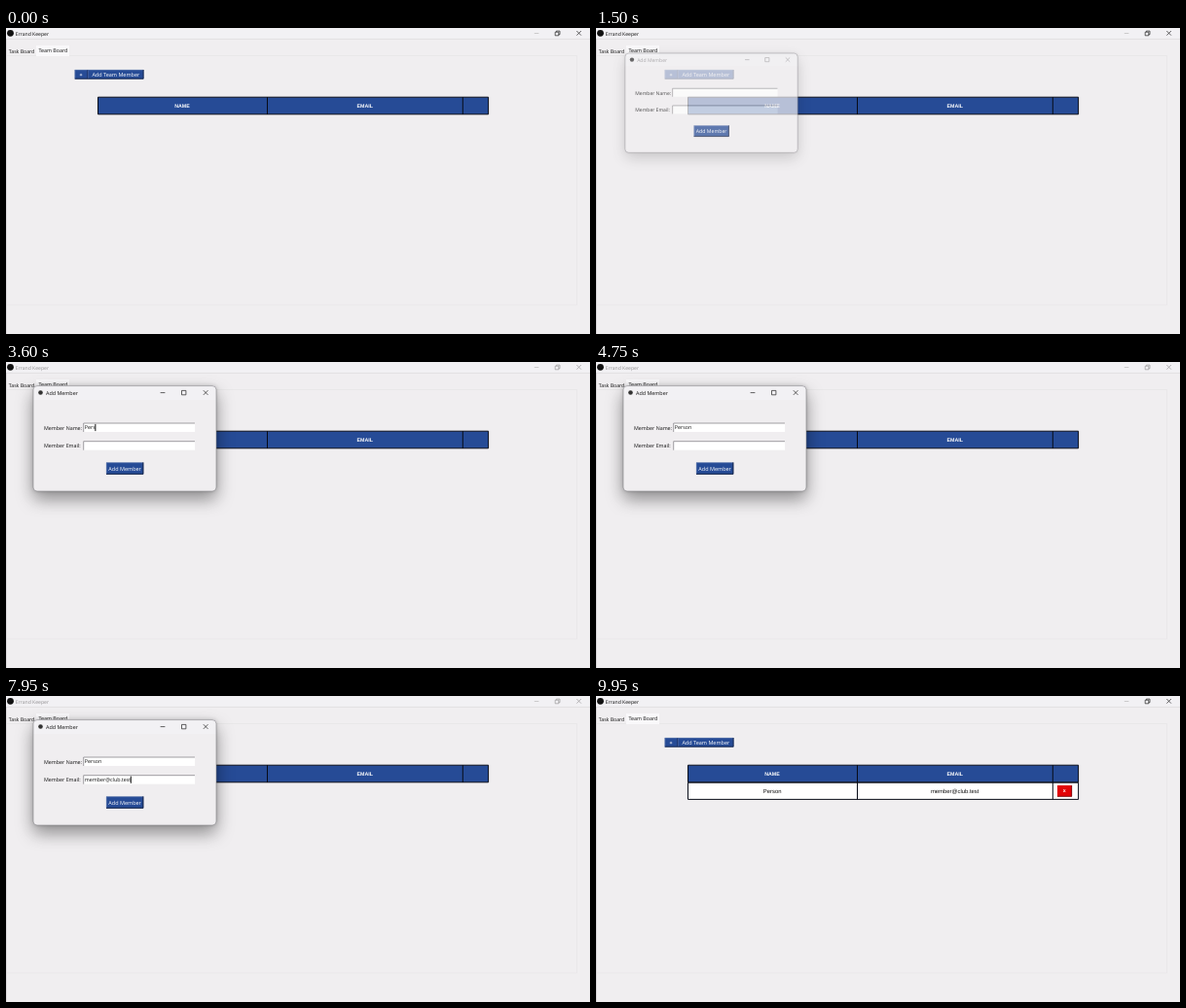
Animation of 600 by 315 pixels, one loop 10 s. Source, as an HTML page:

```html
<!DOCTYPE html>
<html lang="en">
<head>
<meta charset="utf-8">
<title>Team board</title>
<style>
  html, body { margin: 0; width: 100%; height: 100%; overflow: hidden; background: #f0eef0; }
  svg { display: block; width: 600px; height: 315px; }
  text { font-family: "Open Sans", "Noto Sans", sans-serif; font-size: 5.35px; fill: #111; text-rendering: geometricPrecision; white-space: pre; }
  .cell { font-family: "Liberation Sans", Arial, sans-serif; font-size: 5.9px; text-anchor: middle; }
  .head { font-size: 5.3px; font-weight: bold; fill: #fff; }
  .mid { text-anchor: middle; }
  .light { fill: #fff; }
  .icon { fill: none; stroke: #222; stroke-width: .7; }
  .blue { fill: #264b96; }
  .grid { stroke: #080c18; stroke-width: 1; }
  .off text { fill: #949294; }
  .off .icon { stroke: #9a989a; }
  #shade { fill: #f0eef0; filter: drop-shadow(0 8px 9px rgba(0,0,0,.36)) drop-shadow(0 0 2px rgba(0,0,0,.22)); }
  #shade.dim { filter: drop-shadow(0 6px 8px rgba(0,0,0,.2)) drop-shadow(0 0 1.5px rgba(0,0,0,.15)); }
</style>
</head>
<body>
<svg viewBox="0 0 600 315">
  <rect width="600" height="315" fill="#f0eef0"/>
  <rect width="600" height="11" fill="#f2f1f4"/>
  <path d="M0 11.4H600" stroke="#dddbdd" stroke-width=".7"/>
  <path d="M.4 11V315" stroke="#d6d4d6" stroke-width=".8"/>
  <path d="M1 28.5H586.5V285H1" fill="none" stroke="#e6e4e6" stroke-width=".7"/>

  <g id="bar">
    <circle cx="4.5" cy="5.3" r="3.4" fill="#111"/>
    <text x="9.8" y="7.5" style="font-size:5.1px">Errand Keeper</text>
    <path class="icon" d="M542.8 5.5h4.6" style="stroke:#bbb"/>
    <path class="icon" d="M564.2 4.2h3.6v3.6h-3.6zM565.4 4.2v-1.1h3.6v3.6h-1.2"/>
    <path class="icon" d="M586.3 3l4.6 4.6m0-4.6l-4.6 4.6"/>
  </g>

  <rect x="31" y="18" width="34" height="11" fill="#f9f8fa"/>
  <text x="2.8" y="26.2" style="font-size:5.2px">Task Board</text>
  <text x="33.4" y="25.4">Team Board</text>

  <g>
    <rect class="blue" x="70.6" y="43" width="70.8" height="9.5"/>
    <path d="M70.8 52.3V43.2H141" fill="none" stroke="#8496bd" stroke-width=".5"/>
    <path d="M70.8 52.2H141.1V43" fill="none" stroke="#101c3c" stroke-width=".8"/>
    <path d="M83.8 43.4V52" stroke="#13224a" stroke-width=".7"/>
    <path d="M84.4 43.6V51.8" stroke="#7189ba" stroke-width=".4"/>
    <text class="mid light" x="77" y="49.8" font-weight="bold">+</text>
    <text class="light" x="88.4" y="49.9" style="font-size:5.5px">Add Team Member</text>
  </g>

  <g>
    <path class="blue grid" d="M94.5 71.2H495.6V88.8H94.5zM268.5 71V89M469.3 71V89"/>
    <text class="cell head" x="181" y="81.9">NAME</text>
    <text class="cell head" x="368.7" y="81.9">EMAIL</text>
  </g>
  <g id="row">
    <path class="grid" fill="#fff" d="M94.5 89.2H495.6V106.4H94.5zM268.5 89V106.5M469.3 89V106.5"/>
    <text class="cell" x="181.2" y="99.9">Person</text>
    <text class="cell" x="368.7" y="99.9">member@club.test</text>
    <rect x="474" y="92" width="15" height="11.6" fill="#e20408"/>
    <path d="M474 103.3H488.7V92" fill="none" stroke="#5c0a0c" stroke-width=".7"/>
    <text class="cell head" x="481.2" y="99.4">x</text>
  </g>

  <g id="popup">
    <rect id="shade" x="28" y="24.6" width="188" height="108.4" rx="4"/>
    <path d="M28 39V28.6a4 4 0 0 1 4-4H212a4 4 0 0 1 4 4V39z" fill="#f2f1f4"/>
    <rect x="28" y="24.6" width="188" height="108.4" rx="4" fill="none" stroke="#858388" stroke-width=".6"/>
    <g id="head">
      <circle cx="35.5" cy="31.5" r="2.3" fill="#333"/>
      <text x="41" y="33.6" style="font-size:5.4px">Add Member</text>
      <path class="icon" d="M158.6 31.6h4.8"/>
      <path class="icon" d="M180.5 29.4h4.4v4.4h-4.4z"/>
      <path class="icon" d="M202.8 29.2l4.7 4.7m0-4.7l-4.7 4.7"/>
    </g>
    <text x="39" y="69.7">Member Name:</text>
    <text x="39" y="88.4">Member Email:</text>
    <rect x="79.5" y="62.8" width="114.6" height="9.2" fill="#fff"/>
    <path d="M79.7 72V63H194" fill="none" stroke="#77757a" stroke-width=".7"/>
    <rect x="79.5" y="81.5" width="114.6" height="9.2" fill="#fff"/>
    <path d="M79.7 90.7V81.7H194" fill="none" stroke="#77757a" stroke-width=".7"/>
    <text id="name" x="80.8" y="69.4"></text>
    <text id="mail" x="80.8" y="88.1"></text>
    <rect id="caret" width="1" height="7.2" fill="#111"/>
    <rect id="face" x="103" y="103.4" width="38.2" height="12.2"/>
    <path id="edgeA" d="M103.2 115.4V103.6H141" fill="none" stroke-width=".6"/>
    <path id="edgeB" d="M103 115.3H140.9V103.4" fill="none" stroke-width=".9"/>
    <text id="label" class="mid" x="122.1" y="111.5" style="font-size:5.5px">Add Member</text>
  </g>
</svg>
<script>
const LOOP = 10000;
const FOCUS = 2200, MAIL = 5050, PRESS = 8600, ADDED = 8770;

// time, opacity, scale
const FADE = [
  [1400, 0, .9], [1500, .72, .943], [1650, 1, 1],
  [8770, 1, 1], [8850, .42, .968], [8930, 0, .94]
];

const el = {};
document.querySelectorAll('[id]').forEach(n => el[n.id] = n);
const set = (n, attrs) => { for (const k in attrs) n.setAttribute(k, attrs[k]); };
const show = (n, on) => n.style.display = on ? '' : 'none';

function fadeAt(t) {
  const i = FADE.findIndex(k => k[0] > t);
  if (i < 1) return [0, 1];
  const [a, b] = [FADE[i - 1], FADE[i]];
  const p = (t - a[0]) / (b[0] - a[0]);
  return [1, 2].map(j => a[j] + (b[j] - a[j]) * p);
}

function typed(text, t, start, pace) {
  return text.slice(0, Math.max(0, Math.floor((t - start) / pace) + 1));
}

function draw(t) {
  const [alpha, scale] = fadeAt(t);
  const active = t >= FOCUS && t < ADDED;
  const pressed = t >= PRESS;

  show(el.row, t >= ADDED);
  show(el.popup, alpha > 0);
  const [cx, cy] = t < 5000 ? [61, 50] : [90, 71];
  set(el.popup, {
    opacity: alpha,
    transform: `translate(${cx} ${cy}) scale(${scale}) translate(${-cx} ${-cy})`
  });
  el.bar.classList.toggle('off', active);
  el.head.classList.toggle('off', !active);
  el.shade.classList.toggle('dim', !active);

  el.name.textContent = typed('Person', t, 3000, 200);
  el.mail.textContent = typed('member@club.test', t, 5150, 160);

  const inMail = t >= MAIL;
  const since = t - (inMail ? MAIL : FOCUS);
  const on = since >= 0 && since % 900 < 600;
  show(el.caret, on);
  if (on) {
    const field = inMail ? el.mail : el.name;
    const w = field.textContent ? field.getComputedTextLength() : 0;
    set(el.caret, { x: 80.4 + w, y: inMail ? 82.6 : 63.9 });
  }

  set(el.face, { fill: pressed ? '#f0eef0' : '#264b96' });
  set(el.edgeA, { stroke: pressed ? '#333' : '#8496bd' });
  set(el.edgeB, { stroke: pressed ? '#fff' : '#101c3c' });
  el.label.style.fill = pressed ? '#111' : '#fff';
}

function tick() {
  draw(performance.now() % LOOP);
  requestAnimationFrame(tick);
}
tick();
</script>
</body>
</html>
```
